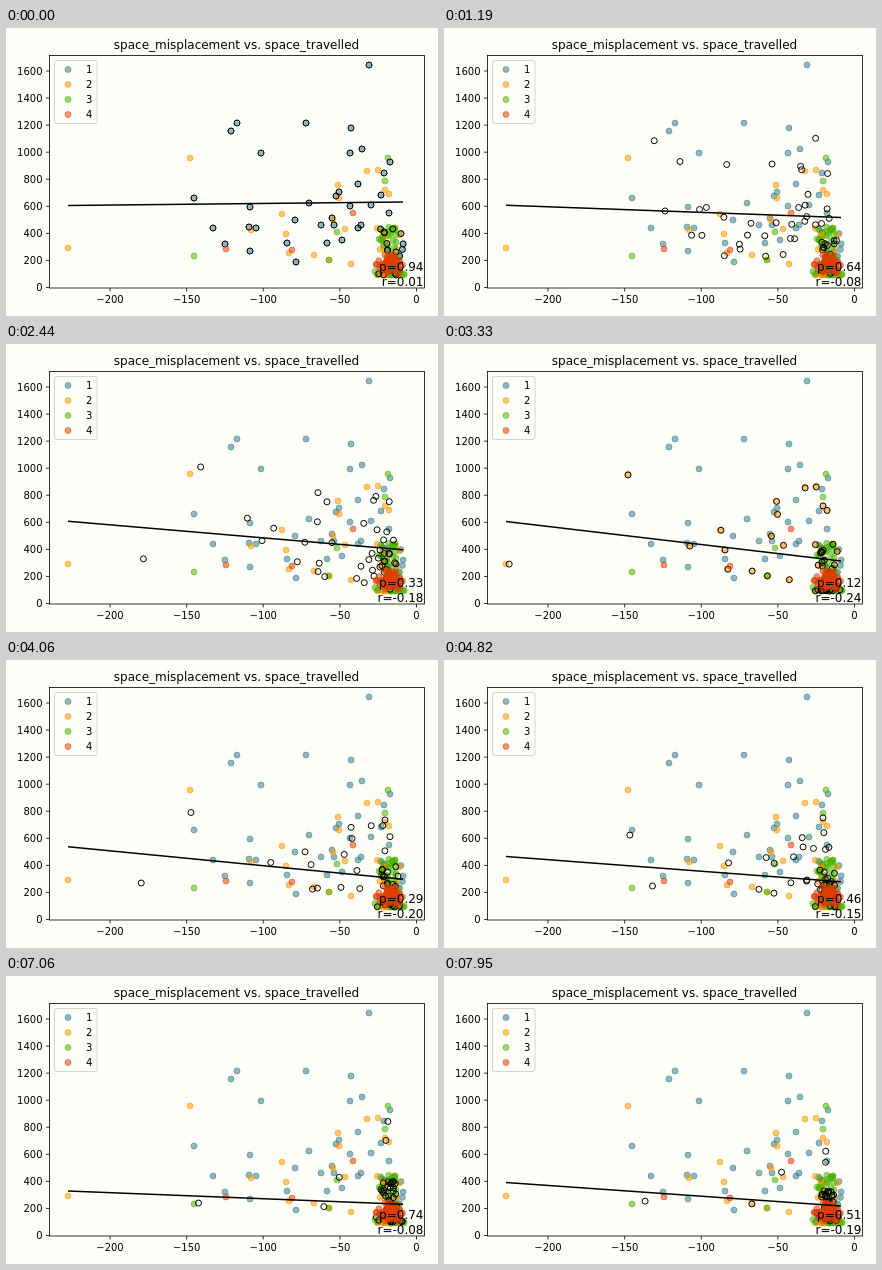
These frames come from a looping animation (432x288 px, 7990 ms). An HTML page with a canvas:

```html
<!DOCTYPE html>
<html lang="en">
<head>
<meta charset="utf-8">
<title>Scatter transition</title>
<style>
  html, body { margin: 0; width: 100%; height: 100%; overflow: hidden; background: #fffffa; }
  canvas { display: block; width: 432px; height: 288px; }
</style>
</head>
<body>
<canvas id="stage"></canvas>
<script>
const LOOP = 7990, STEP = 33.02, STEPS_PER_GROUP = 100, SUBJECTS = 54;
const COLORS = ['50,125,140', '255,150,0', '75,180,0', '225,62,0'];
const FONT = '"DejaVu Sans", sans-serif';

// Outlying points per group; a subject keeps its index in every group.
const OUTLIERS = [
  [[225,103],[328,197],[231,95],[300,95],[344,125],[188,170],[281,215],[219,216],
   [255,125],[384,134],[289,192],[250,200],[352,200],[207,200],[355,197],[244,179],
   [315,197],[383,185],[244,223],[345,100],[352,156],[330,168],[333,164],[243,199],
   [363,37],[356,121],[378,145],[375,167],[303,175],[344,178],[365,177],[326,190],
   [336,212],[321,215],[290,234]],
  [[184,130],[308,227],[245,202],[378,209],[379,162],[280,206],[323,232],[327,192],
   [332,157],[383,166],[339,201],[333,170],[62,220],[361,143],[372,142],[276,186],
   [283,225],[389,200],[345,236]],
  [[188,228],[323,232],[331,204],[382,130],[379,153],[389,200],[375,212]],
  [[220,221],[286,222],[347,185]]
];

// One value per group, blended linearly between groups.
const FIT_LEFT = [177.5, 177, 219.4, 188];
const FIT_RIGHT = [174, 217, 227.3, 234];
const P_VALUE = [0.94, 0.115, 0.859, 0.006];
const R_VALUE = [0.01, -0.245, -0.03, -0.415];

let seed = 41;
const random = () => (seed = (seed * 16807) % 2147483647) / 2147483647;
const spread = () => random() + random() - 1;

// All other points crowd the lower right corner; earlier groups tail upwards.
function crowded(group) {
  const y = group < 3 ? 247 - 48 * random() ** 2 : 237 + 12 * spread();
  return [384 + 16 * spread(), y];
}

const groups = OUTLIERS.map((known, g) =>
  Array.from({ length: SUBJECTS }, (_, i) => known[i] || crowded(g)));

const canvas = document.getElementById('stage');
const ctx = canvas.getContext('2d');
const ratio = window.devicePixelRatio || 1;
canvas.width = 432 * ratio;
canvas.height = 288 * ratio;

function text(str, x, y, size, align) {
  ctx.font = `${size}px ${FONT}`;
  ctx.textAlign = align;
  ctx.fillStyle = '#000';
  ctx.fillText(str, x, y);
}

function line(x1, y1, x2, y2, width) {
  ctx.strokeStyle = '#000';
  ctx.lineWidth = width;
  ctx.beginPath();
  ctx.moveTo(x1, y1);
  ctx.lineTo(x2, y2);
  ctx.stroke();
}

function circle(x, y, stroke, fill) {
  ctx.beginPath();
  ctx.arc(x, y, 3, 0, Math.PI * 2);
  if (fill) {
    ctx.fillStyle = fill;
    ctx.fill();
  }
  ctx.strokeStyle = stroke;
  ctx.lineWidth = 1;
  ctx.stroke();
}

function dot(x, y, group) {
  circle(x, y, `rgba(${COLORS[group]},.5)`, `rgba(${COLORS[group]},.55)`);
}

function drawAxes() {
  ctx.strokeStyle = '#000';
  ctx.lineWidth = 0.8;
  ctx.strokeRect(43.5, 27.5, 375, 232.5);
  for (let v = -200; v <= 0; v += 50) {
    const x = 410.5 + v * 1.5325;
    line(x, 260, x, 263.5, 0.8);
    text(String(v).replace('-', '\u2212'), x, 274.5, 10, 'center');
  }
  for (let v = 0; v <= 1600; v += 200) {
    const y = 259.5 - v * 0.1353;
    line(40, y, 43.5, y, 0.8);
    text(String(v), 36.5, y + 3.8, 10, 'right');
  }
  text('space_misplacement vs. space_travelled', 230.5, 21, 12, 'center');
}

function drawLegend() {
  ctx.beginPath();
  ctx.roundRect(48.5, 32.5, 42.5, 63, 2);
  ctx.fillStyle = 'rgba(255,255,250,.8)';
  ctx.fill();
  ctx.strokeStyle = '#d6d6c4';
  ctx.lineWidth = 1;
  ctx.stroke();
  COLORS.forEach((_, g) => {
    dot(62, 41.5 + g * 15, g);
    text(String(g + 1), 80, 45 + g * 15, 10, 'left');
  });
}

function draw(time) {
  const position = Math.floor((time + 8) / STEP) / STEPS_PER_GROUP;
  const from = Math.min(2, Math.floor(position));
  const u = position - from;
  const mix = (a, b) => a + (b - a) * u;
  const blend = values => mix(values[from], values[from + 1]);

  ctx.setTransform(ratio, 0, 0, ratio, 0, 0);
  ctx.fillStyle = '#fffffa';
  ctx.fillRect(0, 0, 432, 288);

  for (let g = 0; g < 3; g++) groups[g].forEach(([x, y]) => dot(x, y, g));
  groups[from].forEach(([x, y], i) => {
    const [toX, toY] = groups[from + 1][i];
    circle(mix(x, toX), mix(y, toY), '#000');
  });
  groups[3].forEach(([x, y]) => dot(x, y, 3));

  line(62, blend(FIT_LEFT), 397, blend(FIT_RIGHT), 1.5);
  drawAxes();
  drawLegend();
  text('p=' + blend(P_VALUE).toFixed(2), 417.5, 242.5, 12, 'right');
  text('r=' + blend(R_VALUE).toFixed(2), 417.5, 257.5, 12, 'right');
}

const start = performance.now();
function tick() {
  draw((performance.now() - start) % LOOP);
  requestAnimationFrame(tick);
}
tick();
</script>
</body>
</html>
```
